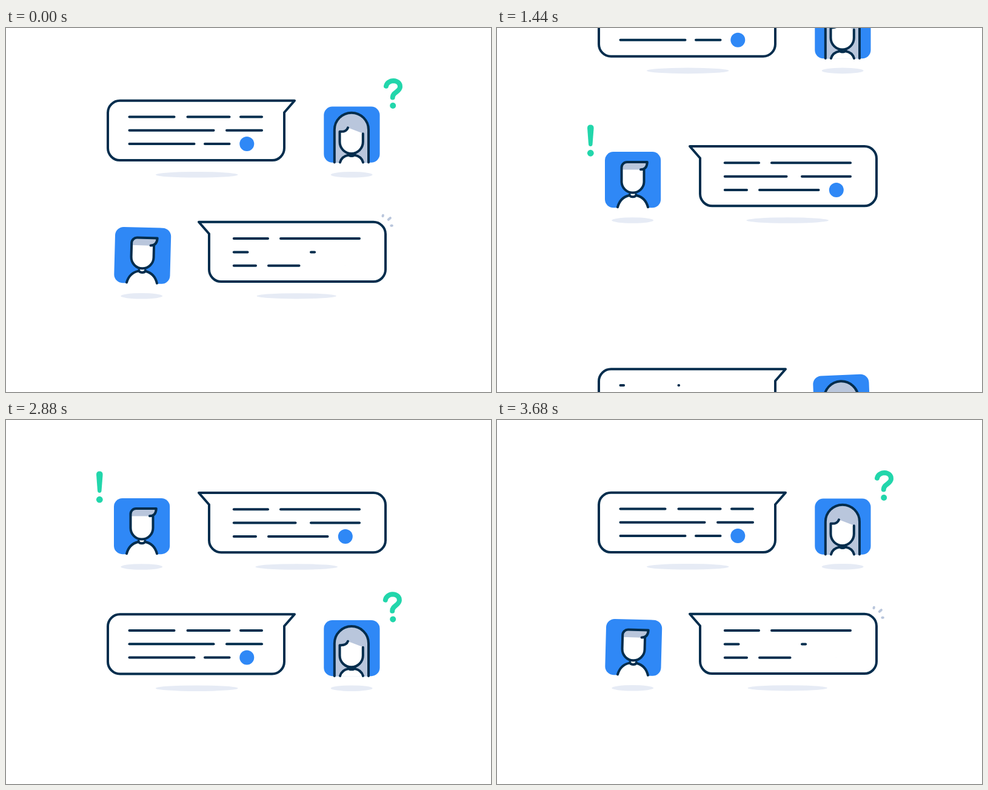
An HTML page for the animation above (3720 ms loop, 800x600 px).

```html
<!DOCTYPE html>
<html lang="en">
<head>
<meta charset="utf-8">
<title>Chat</title>
<style>
  html, body { margin: 0; width: 100%; height: 100%; overflow: hidden; background: #fff; }
  svg { display: block; width: 800px; height: 600px; }
  .ink { fill: none; stroke: #032d4d; stroke-width: 4; stroke-linecap: round; stroke-linejoin: round; }
  .ray { stroke: #b9c6dc; stroke-width: 4; stroke-linecap: round; }
  .hair { fill: #b9c6dc; }
  .skin { fill: #fff; }
  .blue { fill: #2f88f6; }
  .shade { fill: #e6ebf5; }
  .mark { fill: #22d6ab; }
  .hook { fill: none; stroke: #22d6ab; stroke-width: 8; stroke-linecap: round; }
</style>
</head>
<body>
<svg id="stage" viewBox="0 0 800 600"></svg>
<script>
const LOOP = 3720, CYCLE = 3680, HALF = CYCLE / 2, STEP = 40, SLOT = 200.2;

const BUBBLE = 'M188 120H476L459 139.5V198.3a20 20 0 0 1-20 20H188a20 20 0 0 1-20-20V140a20 20 0 0 1 20-20Z';

const WOMAN = `
  <rect class="blue" x="524.3" y="129.8" width="92.2" height="92.2" rx="14"/>
  <path class="hair" d="M541.8 222V168a28.1 28.1 0 0 1 56.2 0V222Z"/>
  <path class="skin" d="M551 222.5C553 214.5 558 211 565 209.5L570 205L575 209.5C582 211 587 214.5 589 222.5Z"/>
  <path class="skin" d="M550.5 171C558 171.5 562.5 169 564 164.5L588.8 174V188a19.1 19.1 0 0 1-38.3 0Z"/>
  <path class="ink" d="M541.8 221.7V168a28.1 28.1 0 0 1 56.2 0V221.7
    M564 164.5C562.5 169 558 171.5 550.5 171V188a19.1 19.1 0 0 0 38.3 0V174.5
    M551 221.7C553 214.5 558 211 565 209.8M589 221.7C587 214.5 582 211 575 209.8
    M564.5 208c1 4.2 10 4.2 11 0"/>`;

const MAN = `
  <rect class="blue" x="178" y="129" width="92.2" height="92.2" rx="14"/>
  <path class="skin" d="M199 222C202 209 209 203 218 201L224 195L230 201C239 203 246 209 249 222Z"/>
  <path class="skin" d="M205.5 157V178a18.5 18.5 0 0 0 37 0V157Z"/>
  <path class="hair" d="M205.5 158.5V155a9 9 0 0 1 9-9H247.8C247.5 154 244 158.5 237 158.5Z"/>
  <path class="ink" d="M205.5 158V178a18.5 18.5 0 0 0 37 0V158
    M205.5 158V155a9 9 0 0 1 9-9H247.8C247.5 154 244 158.3 237 158.3
    M199 220.3C202 209 209 203 218 201M249 220.3C246 209 239 203 230 201
    M218.5 199.8c1 4.6 10 4.6 11 0"/>`;

const QUESTION = `
  <path class="hook" d="M627 96C628 91 633 87.1 639 87.1C646 87.4 650.3 91.5 650 97.5C649.5 105.5 637.7 106 637.7 114.6"/>
  <circle class="mark" cx="638.2" cy="128.2" r="5"/>`;

const BANG = `
  <path class="mark" d="M149 90Q149 84.5 154.3 84.5Q159.6 84.5 159.6 90L157.5 117Q157 120 154.3 120Q151.5 120 151 117Z"/>
  <circle class="mark" cx="154.3" cy="131.2" r="5.4"/>`;

// Lines in drawing order: x1, x2, text row
const ROWS = [
  {
    start: 1160, tilt: -1, flip: '', figure: WOMAN, mark: QUESTION,
    pivot: [570.4, 220], hinge: [638.2, 128.2], top: 146.7, bubbleX: 314.7,
    lines: [
      [203.5, 277.5, 0], [299.5, 368.5, 0], [387, 422, 0],
      [203.5, 342.5, 1], [364, 422, 1],
      [203.5, 310.5, 2], [328, 368.5, 2]
    ],
    dot: [397.3, 680]
  },
  {
    start: 1160 + HALF, tilt: 1, flip: 'translate(794 0) scale(-1 1)', figure: MAN, mark: BANG,
    pivot: [224, 220], hinge: [154.3, 131.2], top: 147.3, bubbleX: 479.2,
    lines: [
      [375.8, 432, 0], [453, 583, 0],
      [375.8, 412, 2], [433, 530.5, 2],
      [375.8, 477.5, 1], [503, 583, 1]
    ],
    dot: [559.8, 640]
  }
];

const clamp = x => Math.min(1, Math.max(0, x));
const circIn = x => 1 - Math.sqrt(1 - x * x);
const backOut = x => 1 + 2.7 * (x - 1) ** 3 + 1.7 * (x - 1) ** 2;

// S-curve that runs slightly past 1 and settles back
const glide = (ms, scale, power) =>
  1 - Math.exp(-((ms / scale) ** power)) + .017 * Math.exp(-(((ms - 480) / 120) ** 2));

function rowY(age) {
  if (age < HALF) return SLOT * (3 - 2 * glide(age, 330, 4.2));
  if (age < CYCLE) return SLOT * (1 - glide(age - HALF, 282, 3.04));
  return -28 * ((age - CYCLE) / 120) ** 2.14;
}

// One swing each way, the second one quicker
const tilt = age => 4.2 * Math.sin(Math.PI * Math.min(2, (age / 728) ** 1.8));

function sway(age) {
  const x = clamp((age - 1080) / 840);
  return 3.3 * Math.sin(2 * Math.PI * x) * Math.exp(-.6 * x);
}

const show = (el, on) => el.setAttribute('visibility', on ? 'inherit' : 'hidden');
const set = (el, attrs) => { for (const k in attrs) el.setAttribute(k, attrs[k]); };
const hinged = ([x, y], deg, s) => `translate(${x} ${y}) rotate(${deg}) scale(${s}) translate(${-x} ${-y})`;

function buildRow(row) {
  const g = document.createElementNS('http://www.w3.org/2000/svg', 'g');
  const lineY = n => row.top + 22.3 * n;
  const ray = i => `<line class="ray" transform="translate(177 128.3) rotate(${7 + 34.5 * i})"/>`;
  g.innerHTML = `
    <ellipse class="shade" cx="${row.pivot[0] - .3}" cy="242" rx="34.5" ry="4.8"/>
    <ellipse class="shade grow" cx="${row.bubbleX}" cy="242" rx="67.8" ry="4.8"/>
    <g transform="${row.flip}">
      <path class="ink" d="${BUBBLE}"/>
      ${[0, 1, 2].map(ray).join('')}
    </g>
    ${row.lines.map(([x, , n]) => `<line class="ink text" x1="${x}" y1="${lineY(n)}" y2="${lineY(n)}"/>`).join('')}
    <circle class="blue dot" cx="${row.dot[0]}" cy="${lineY(2)}"/>
    <g class="card">${row.figure}</g>
    <g class="sign">${row.mark}</g>`;
  document.getElementById('stage').append(g);

  const one = s => g.querySelector(s);
  const rays = g.querySelectorAll('.ray'), texts = g.querySelectorAll('.text');
  const shade = one('.grow'), dot = one('.dot'), card = one('.card'), sign = one('.sign');

  return age => {
    show(g, age < CYCLE + 440);
    set(g, { transform: `translate(0 ${rowY(age)})` });

    const s = 1 - (1 - clamp((age - 500) / 220)) ** 2;
    set(shade, { rx: 67.8 * s, ry: 4.8 * s });

    rays.forEach((el, i) => {
      const start = i === 1 ? 476 : 510, length = i === 1 ? 20 : 11;
      const head = circIn(clamp((age - start) / 340));
      const tail = clamp((age - start - 340) / 260);
      show(el, age >= start && tail < 1);
      set(el, { x1: -18.5 - length * tail, x2: -18.5 - length * head });
    });

    row.lines.forEach(([x1, x2], i) => {
      const ms = age - 156 - 80 * i;
      show(texts[i], ms >= 0);
      set(texts[i], { x2: x1 + (x2 - x1) * circIn(clamp(ms / 324.1)) });
    });
    set(dot, { r: 12 * circIn(clamp((age - row.dot[1]) / 324)) });

    set(card, { transform: hinged(row.pivot, row.tilt * tilt(age), 1) });

    show(sign, age > 795);
    set(sign, { transform: hinged(row.hinge, sway(age), backOut(clamp((age - 795) / 300))) });
  };
}

// Each row is drawn twice: once arriving or resting, once leaving
const views = ROWS.flatMap(row => [0, CYCLE].map(extra => ({ row, extra, draw: buildRow(row) })));

function frame(now) {
  const t = Math.floor(now % LOOP / STEP) * STEP % CYCLE;
  for (const { row, extra, draw } of views) draw((t - row.start + CYCLE) % CYCLE + extra);
}

let origin;
function tick(now) {
  if (origin === undefined) origin = now;
  frame(Math.max(0, now - origin));
  requestAnimationFrame(tick);
}
frame(0);
requestAnimationFrame(tick);
</script>
</body>
</html>
```
